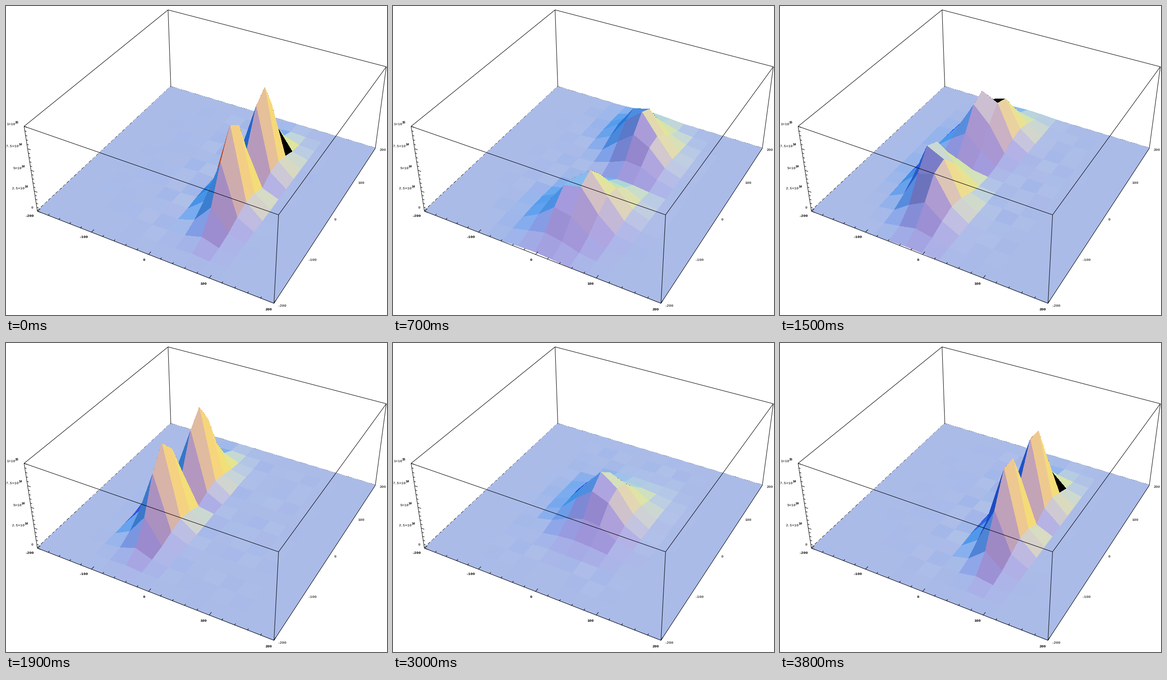
Recreate the animation shown at these times as a matplotlib script. Size 831x674 px, loop 3900 ms.

```python
import itertools
import numpy as np
import matplotlib.pyplot as plt
from matplotlib.animation import FuncAnimation
from matplotlib.collections import LineCollection, PolyCollection

W, H, DPI = 831, 674, 100
FRAMES, INTERVAL = 39, 100
N = 15                              # grid points per side
Z_RATIO = 0.4                       # box height relative to its width
EYE = np.array([1.8, -1.9, 2.2])    # camera in box units
PX = 72 / DPI

# Screen corners of the unit box, keyed by (x, y, z).
CORNERS = {
    (0, 0, 0): (68, 447), (1, 0, 0): (584, 648),
    (1, 1, 0): (805, 310), (0, 1, 0): (359, 176),
    (0, 0, 1): (39, 262), (1, 0, 1): (594, 455),
    (1, 1, 1): (829, 132), (0, 1, 1): (353, 8),
}


def fit_camera():
    """Least-squares projection matrix through the box corners."""
    rows, rhs = [], []
    for (x, y, z), (u, v) in CORNERS.items():
        p = [x, y, z, 1]
        rows.append(p + [0] * 4 + [-u * x, -u * y, -u * z])
        rows.append([0] * 4 + p + [-v * x, -v * y, -v * z])
        rhs += [u, v]
    sol = np.linalg.lstsq(np.array(rows, float), np.array(rhs, float), rcond=None)[0]
    return np.append(sol, 1).reshape(3, 4)


CAMERA = fit_camera()


def project(x, y, z):
    pts = np.stack(np.broadcast_arrays(x, y, z, 1.0), axis=-1) @ CAMERA.T
    return pts[..., :2] / pts[..., 2:]


I, J = np.meshgrid(np.arange(N), np.arange(N), indexing="ij")
GX, GY = I / (N - 1), J / (N - 1)


def heights(theta):
    """Two mirrored packets circling, squeezed at both ends of the swing."""
    c, s = np.cos(theta), np.sin(theta)
    cx = 6.9 + 2.05 * c
    cy = 5.25 - 1.75 * s
    amp = 0.53 + 0.48 * c ** 4
    sx = 1.13 - 0.58 * c ** 4
    dx = I - cx
    dy = J - cy - 0.6 * np.sin(2 * theta) * dx
    hump = amp * np.exp(-dx ** 2 / (2 * sx ** 2) - dy ** 2 / (2 * 1.43 ** 2))
    z = np.maximum(hump, hump[:, ::-1])
    envelope = np.exp(-((I - 7) / 3.6) ** 4 - ((J - 7) / 6.3) ** 4)
    ripple = np.sin(2.4 * I + theta) * np.cos(1.9 * (J - 7))
    return np.minimum(z + 0.007 * envelope * (ripple + 0.6), 1)


def shade(z):
    """Face colours from the normal at the first corner of each cell."""
    k = Z_RATIO * (N - 1)
    n = np.stack([-(z[1:, :-1] - z[:-1, :-1]) * k,
                  -(z[:-1, 1:] - z[:-1, :-1]) * k,
                  np.ones((N - 1, N - 1))], axis=-1)
    n /= np.linalg.norm(n, axis=-1, keepdims=True)
    centre = np.stack([GX[:-1, :-1] + 0.5 / (N - 1), GY[:-1, :-1] + 0.5 / (N - 1),
                       z[:-1, :-1] * Z_RATIO], axis=-1)
    view = EYE - centre
    view /= np.linalg.norm(view, axis=-1, keepdims=True)
    facing = (n * view).sum(axis=-1)

    x, y, up = n[..., 0], n[..., 1], n[..., 2]
    slant = np.maximum(x, 0) * up
    red = 0.45 + 0.50 * x + 0.03 * y + 0.217 * up + 0.15 * x * y - 0.25 * slant
    green = 0.60 + 0.16 * x + 0.22 * y + 0.133 * up
    blue = 0.58 - 0.13 * x + 0.33 * up - 0.25 * x * y + 0.15 * slant
    green = np.where(x < -0.5, green * np.clip(0.2 + 6 * facing, 0, 1), green)
    front = np.stack([red, green, blue], axis=-1)
    back = np.maximum(-x, 0)[..., None] * np.array([0.75, 0.3, 0.13])
    return np.clip(np.where(facing[..., None] < 0, back, front), 0, 1)


def cells(z):
    p = project(GX, GY, z)
    return np.stack([p[:-1, :-1], p[1:, :-1], p[1:, 1:], p[:-1, 1:]], axis=2)


def far_to_near(a):
    return a[:, ::-1].reshape((-1,) + a.shape[2:])


fig = plt.figure(figsize=(W / DPI, H / DPI), dpi=DPI, facecolor="white")
ax = fig.add_axes([0, 0, 1, 1])
ax.set_xlim(0, W)
ax.set_ylim(H, 0)
ax.axis("off")


def add_lines(segments):
    # Shift to pixel centres.
    ax.add_collection(LineCollection(np.array(segments) + 0.5, colors="black",
                                     linewidths=PX, zorder=4))


def label(x, y, text, size=5.9, bold=False, ha="center"):
    ax.text(x, y, text, fontsize=size, family="Liberation Mono", ha=ha,
            va="center", weight="bold" if bold else "normal", zorder=5)


def draw_box():
    hidden = {((0, 0, 0), (0, 1, 0)), ((0, 1, 0), (1, 1, 0))}
    edges = []
    for a, b in itertools.combinations(sorted(CORNERS), 2):
        if sum(p != q for p, q in zip(a, b)) == 1 and (a, b) not in hidden:
            edges.append([CORNERS[a], CORNERS[b]])
    add_lines(edges)
    # Rear floor edges flicker through the surface as dashes.
    for a, b, dash in (((68, 447), (359, 176), (7, 4)),
                       ((359, 176), (805, 310), (2, 2))):
        ax.plot([a[0], b[0]], [a[1] - 0.7, b[1] - 0.7], color="black", lw=PX,
                dashes=dash, zorder=1)


def draw_ticks():
    ticks = []
    for k in range(21):
        f = k / 20
        size = 0.017 if k % 5 == 0 else 0.009
        ticks.append(project(np.array([f, f]), np.array([0, size]), 0.0))
        size = 0.014 if k % 5 == 0 else 0.008
        ticks.append(project(np.array([0, size]), 0.0, np.array([f, f])))
    add_lines(ticks)


def draw_labels():
    values = ("-200", "-100", "0", "100", "200")
    x_spots = ((51, 459), (169, 505), (301, 554), (431, 607), (573, 662))
    y_spots = ((602, 654), (668, 554), (718, 466), (775, 386), (822, 314))
    for text, (x, y) in zip(values, x_spots):
        label(x, y, text, bold=True)
    for text, (x, y) in zip(values, y_spots):
        label(x, y, text)
    label(57, 441, "0")
    for x, y, base, power in ((41, 399, "2.5", "14"), (34, 354, "5", "14"),
                              (28, 307, "7.5", "14"), (20, 258, "1", "15")):
        label(x, y, base + "\u00d710", size=5.7, ha="right")
        label(x, y - 4, power, size=4.8, bold=True, ha="left")


draw_box()
draw_ticks()
draw_labels()
surface = PolyCollection([], edgecolors="none", antialiaseds=False, zorder=2)
ax.add_collection(surface)


def update(frame):
    z = heights(2 * np.pi * frame / FRAMES)
    surface.set_verts(far_to_near(cells(z)))
    surface.set_facecolor(far_to_near(shade(z)))
    return [surface]


anim = FuncAnimation(fig, update, frames=FRAMES, interval=INTERVAL,
                     repeat=True, repeat_delay=0, blit=False)
plt.show()
```
